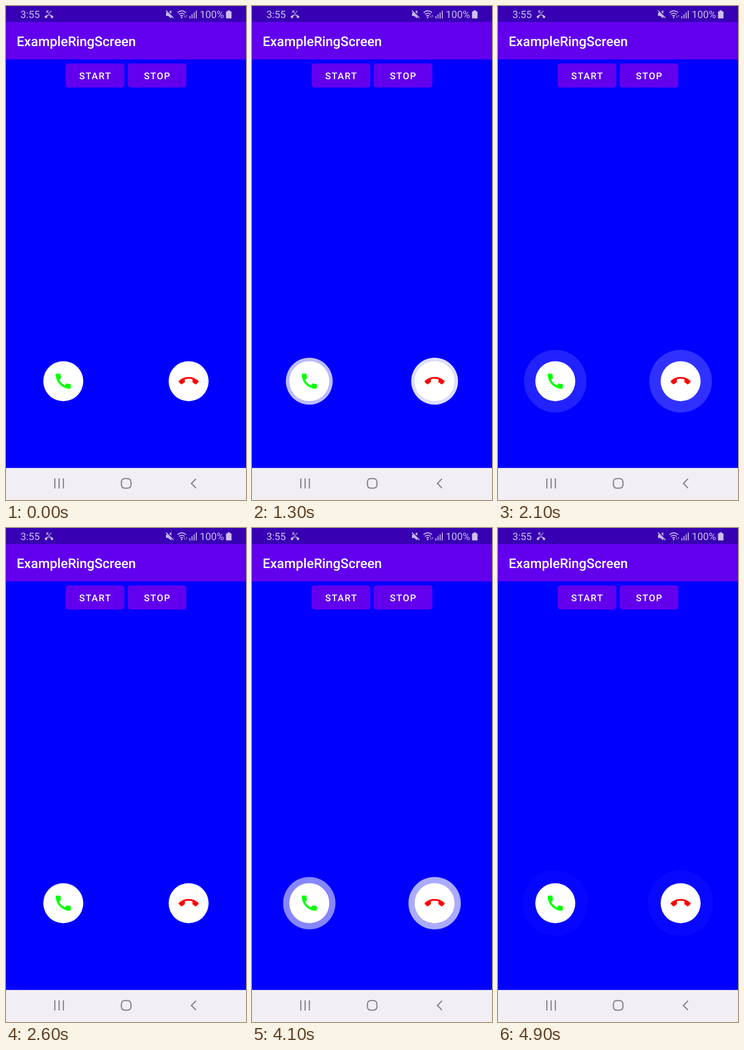
Animation of 522 by 1073 pixels, one loop 5 s. Source, as an HTML page:

```html
<!DOCTYPE html>
<html lang="en">
<head>
<meta charset="utf-8">
<title>Incoming call screen</title>
<style>
  html, body { margin: 0; width: 100%; height: 100%; overflow: hidden; background: #00f; }
  svg { display: block; width: 100%; height: 100%; }
  text { font-family: Roboto, sans-serif; fill: #fff; text-rendering: geometricPrecision; }
  .title { font-size: 29px; font-weight: 500; }
  .label { font-size: 20.3px; font-weight: 500; letter-spacing: 1.81px; text-anchor: middle; }
  .status { fill: #cdbfec; }
  .status text { font-size: 21.8px; fill: inherit; }
  .line { fill: none; stroke: #cdbfec; stroke-width: 2; }
  .nav { fill: none; stroke: #858488; stroke-width: 2.6; }
</style>
</head>
<body>
<svg viewBox="0 0 522 1073">
  <rect width="522" height="1073" fill="#00f"/>
  <rect width="522" height="35" fill="#3700b3"/>
  <rect y="34.8" width="522" height="81.2" fill="#6200ee"/>

  <!-- Status bar -->
  <g class="status">
    <text x="31.5" y="26">3:55</text>
    <path transform="translate(84 7) scale(.79 .95)" d="M6.5 5.5L12 11l7-7-1-1-6 6-4.5-4.5H11V3H5v6h1.5zm17.21 11.17C20.66 13.78 16.54 12 12 12S3.34 13.78.29 16.67q-.58.71 0 1.42l2.48 2.48q.7.58 1.41.01c.79-.74 1.69-1.36 2.66-1.85q.56-.3.56-.9v-3.1a14.8 14.8 0 0 1 9.2 0v3.1q0 .6.56.9c.98.49 1.87 1.12 2.66 1.85q.7.56 1.41-.01l2.48-2.48q.58-.71 0-1.42z"/>
    <path d="M348 14.5h4.5l7-5.5v18l-7-5.5H348z"/>
    <path d="M348 8.5l17 17" stroke="#3700b3" stroke-width="4.4"/>
    <path class="line" d="M348 10l16 16"/>
    <path class="line" d="M373 14.5q9.2-8 18.5 0M376 18.3q6.2-5.2 12.5 0M379 21.8q3-2.4 6.2 0"/>
    <circle cx="382" cy="25" r="1.8"/>
    <path opacity=".7" d="M387 23h1.2v-3h1v3h1.2l-1.7 3zM391 22l1.7-3 1.7 3h-1.2v3h-1v-3z"/>
    <path d="M399 22h2v5h-2zM403.6 18h2v9h-2zM408.2 14h2v13h-2zM412.8 10h2v17h-2z"/>
    <text x="421.5" y="26">100%</text>
    <path d="M482 9.5h5v2h2q1.5 0 1.5 1.5v12.5q0 1.5-1.5 1.5h-9q-1.5 0-1.5-1.5V13q0-1.5 1.5-1.5h2z"/>
  </g>

  <text class="title" x="23.2" y="86.5">ExampleRingScreen</text>

  <g fill="#6200ee">
    <rect x="129.8" y="124.7" width="127.6" height="52.2" rx="5.8"/>
    <rect x="264.6" y="124.7" width="127.6" height="52.2" rx="5.8"/>
  </g>
  <text class="label" x="194.5" y="158.6">START</text>
  <text class="label" x="329.3" y="158.6">STOP</text>

  <!-- Call buttons -->
  <g transform="translate(124.6 814.9)">
    <circle id="answerRing" r="43.5" fill="#fff"/>
    <circle r="43.5" fill="#fff"/>
    <path fill="#0f0" transform="scale(1.8125) translate(-12 -12)" d="M20.01 15.38c-1.23 0-2.42-.2-3.53-.56-.35-.12-.74-.03-1.01.24l-1.57 1.97c-2.83-1.35-5.48-3.9-6.89-6.83l1.95-1.66c.27-.28.35-.67.24-1.02-.37-1.11-.56-2.3-.56-3.53 0-.54-.45-.99-.99-.99H4.19C3.65 3 3 3.24 3 3.99 3 13.28 10.73 21 20.01 21c.71 0 .99-.63.99-1.18v-3.45c0-.54-.45-.99-.99-.99z"/>
  </g>
  <g transform="translate(397.2 814.9)">
    <circle id="declineRing" r="43.5" fill="#fff"/>
    <circle r="43.5" fill="#fff"/>
    <path fill="#f00" transform="scale(1.8125) translate(-12 -12)" d="M12 9c-1.6 0-3.15.25-4.6.72v3.1c0 .39-.23.74-.56.9-.98.49-1.87 1.12-2.66 1.85-.18.18-.43.28-.7.28-.28 0-.53-.11-.71-.29L.29 13.08c-.18-.17-.29-.42-.29-.7 0-.28.11-.53.29-.71C3.34 8.78 7.46 7 12 7s8.66 1.78 11.71 4.67c.18.18.29.43.29.71 0 .28-.11.53-.29.71l-2.48 2.48c-.18.18-.43.29-.71.29-.27 0-.52-.11-.7-.28-.79-.74-1.69-1.36-2.67-1.85-.33-.16-.56-.5-.56-.9v-3.1C15.15 9.25 13.6 9 12 9z"/>
  </g>

  <!-- Navigation bar -->
  <rect y="1003.4" width="522" height="69.6" fill="#f1eff3"/>
  <g class="nav">
    <path d="M106.2 1026v22M115.5 1026v22M124.8 1026v22"/>
    <rect x="251" y="1026.5" width="20.8" height="20.8" rx="7"/>
    <path d="M413.2 1026.8L403.2 1037l10 10.2"/>
  </g>
</svg>
<script>
  const LOOP = 5000, STEP = 100, PULSE = 1900;
  const PULSE_STARTS = [650, 3180];
  const RADIUS = 43.5, GROWTH = 28.3;
  const answerRing = document.getElementById('answerRing');
  const declineRing = document.getElementById('declineRing');

  function setRing(ring, radius, opacity) {
    ring.setAttribute('r', radius);
    ring.setAttribute('opacity', opacity < 0.02 ? 0 : opacity);
  }

  function draw(ms) {
    const time = Math.floor(ms % LOOP / STEP) * STEP;
    const start = PULSE_STARTS.find(s => time >= s && time < s + PULSE);
    const eased = start === undefined ? 1 : (1 - Math.cos(Math.PI * (time - start) / PULSE)) / 2;
    const radius = RADIUS + GROWTH * eased;
    setRing(answerRing, radius, 1 - eased);
    setRing(declineRing, radius, 1 - eased ** 1.5);
  }

  const origin = performance.now();
  function tick() {
    draw(performance.now() - origin);
    requestAnimationFrame(tick);
  }
  tick();
</script>
</body>
</html>
```
